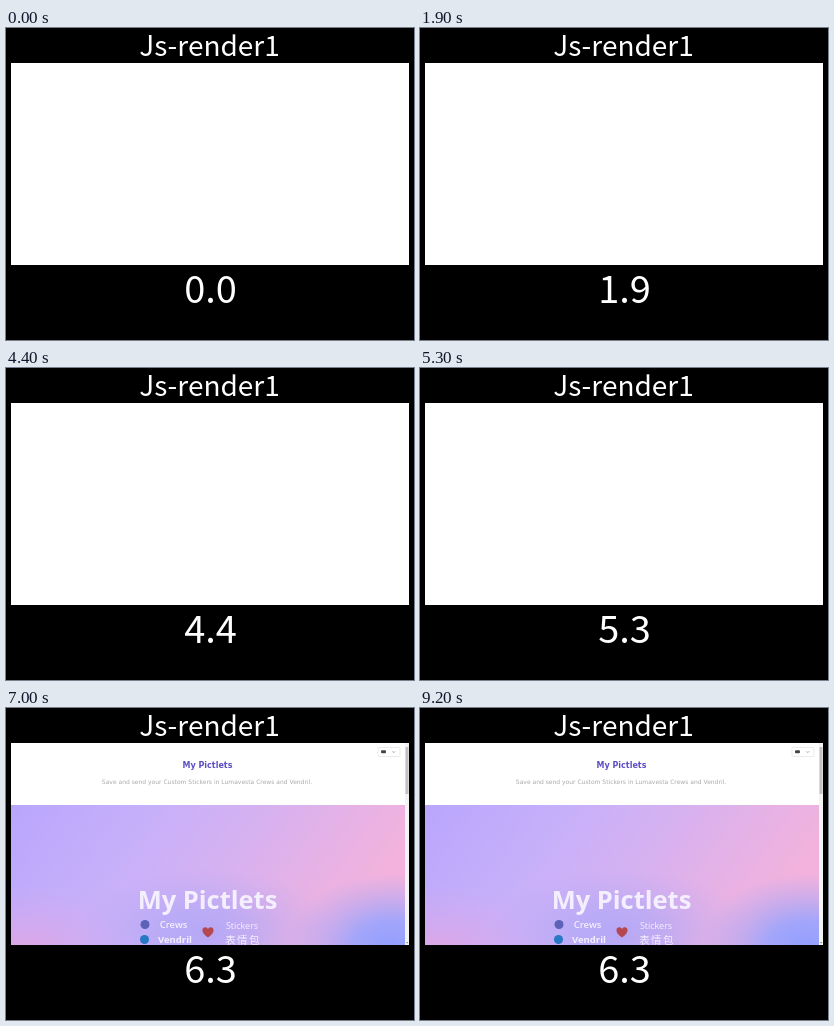
An HTML page that plays this animation: 408 by 312 pixels, repeating every 9300 ms.

```html
<!DOCTYPE html>
<html lang="en">
<head>
<meta charset="utf-8">
<title>Js-render1</title>
<style>
  html, body { margin: 0; width: 100%; height: 100%; overflow: hidden; background: #000; }
  svg { display: block; }
  text { text-anchor: middle; }
  .label { font-family: "Noto Sans CJK SC", "Noto Sans CJK JP", "Noto Sans CJK", "Noto Sans", sans-serif; font-weight: 500; fill: #fff; }
  .head { font-family: "DejaVu Sans", sans-serif; }
  .art { font-family: "Open Sans", "Noto Sans", "Noto Sans CJK SC", "Noto Sans CJK JP", sans-serif; fill: #f4effe; }
  .soft { filter: blur(.35px); }
</style>
</head>
<body>
<svg width="408" height="312" viewBox="0 0 408 312">
  <defs>
    <linearGradient id="base" x1="0" y1="0" x2="1" y2=".25">
      <stop offset="0" stop-color="#b9a6fc"/>
      <stop offset=".35" stop-color="#c7b0fa"/>
      <stop offset=".6" stop-color="#d5b1f1"/>
      <stop offset="1" stop-color="#f2b2dd"/>
    </linearGradient>
    <radialGradient id="blue">
      <stop offset="0" stop-color="#929fff"/>
      <stop offset=".35" stop-color="#9aa4fd" stop-opacity=".9"/>
      <stop offset="1" stop-color="#a8a8f8" stop-opacity="0"/>
    </radialGradient>
    <radialGradient id="pink">
      <stop offset="0" stop-color="#dfa6e4"/>
      <stop offset="1" stop-color="#d4aaee" stop-opacity="0"/>
    </radialGradient>
    <clipPath id="screen"><rect x="5" y="35" width="398" height="202"/></clipPath>
    <clipPath id="reveal"><rect id="heroClip" x="5" y="97" width="394" height="140"/></clipPath>
  </defs>

  <text class="label" x="203.5" y="28" font-size="28">Js-render1</text>
  <rect x="5" y="35" width="398" height="202" fill="#fff"/>

  <g clip-path="url(#screen)">
    <g id="scrollbar">
      <rect x="399" y="35" width="4" height="202" fill="#f3f3f3"/>
      <rect x="399.5" y="39" width="3" height="47" fill="#c2c2c2"/>
      <path d="M400 234h2.4l-1.2 1.6z" fill="#888"/>
    </g>

    <g id="page">
      <g class="soft">
        <rect x="372" y="39.5" width="22" height="9" rx="1" fill="#fff" stroke="#e2e2e2" stroke-width=".7"/>
        <rect x="375" y="42.3" width="5" height="3" rx="1" fill="#444"/>
        <path d="M386.5 43.3l1.3 1.3 1.3-1.3" fill="none" stroke="#888" stroke-width=".8"/>
        <text class="head" x="201.5" y="60" font-size="8" font-weight="700" fill="#5d4fc6">My Pictlets</text>
        <text class="head" x="201" y="76" font-size="6" fill="#aaa">Save and send your Custom Stickers in Lumavesta Crews and Vendril.</text>
      </g>

      <g clip-path="url(#reveal)">
        <rect x="5" y="97" width="394" height="140" fill="url(#base)"/>
        <ellipse cx="20" cy="245" rx="110" ry="70" fill="url(#pink)"/>
        <ellipse cx="200" cy="225" rx="130" ry="65" fill="url(#blue)" opacity=".5"/>
        <ellipse cx="385" cy="238" rx="105" ry="72" fill="url(#blue)"/>
        <g class="art soft">
          <text x="201.5" y="201" font-size="25.5" font-weight="700">My Pictlets</text>
          <circle cx="139" cy="216.5" r="4.5" fill="#5b62b8"/>
          <circle cx="138.5" cy="231.5" r="4.5" fill="#2878c4"/>
          <text x="167.5" y="220" font-size="9.5" font-weight="600">Crews</text>
          <text x="169" y="235" font-size="9.5" font-weight="700">Vendril</text>
          <path d="M202 229.5c-4-3-6-5.200-5.500-8 .5-3 4.500-3 5.500-.4 1-2.600 5-2.600 5.500 .4 .5 2.800-1.500 5-5.500 8z" fill="#b5484f"/>
          <text x="236" y="220.500" font-size="9">Stickers</text>
          <text x="237" y="235.500" font-size="10.500" letter-spacing="1.300">表情包</text>
        </g>
      </g>
    </g>
  </g>

  <text id="clock" class="label" x="204.500" y="275" font-size="38">0.0</text>
</svg>
<script>
  const LOOP = 9300, SCROLLBAR_AT = 60, PAGE_AT = 62, DONE_AT = 63;
  const el = id => document.getElementById(id);
  const show = (id, on) => el(id).setAttribute("visibility", on ? "visible" : "hidden");

  function draw(now) {
    const tick = Math.min(Math.floor(now % LOOP / 100), DONE_AT);
    el("clock").textContent = (tick / 10).toFixed(1);
    show("scrollbar", tick >= SCROLLBAR_AT);
    show("page", tick >= PAGE_AT);
    el("heroClip").setAttribute("height", tick < DONE_AT ? 19 : 140);
    requestAnimationFrame(() => draw(performance.now()));
  }
  draw(performance.now());
</script>
</body>
</html>
```
